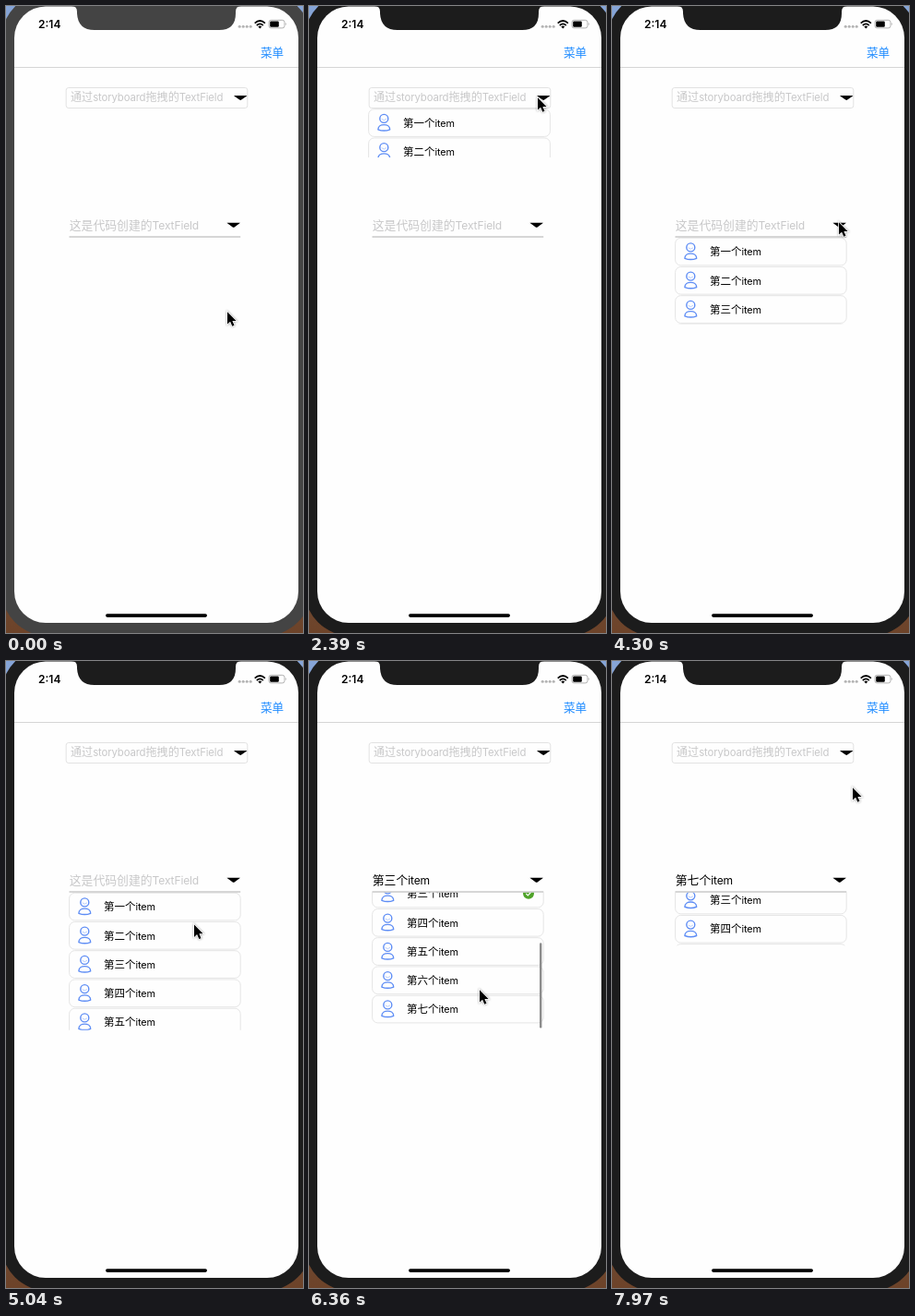
Recreate the animation shown at these times as an HTML page. Size 322 by 679 pixels, loop 8000 ms.

```html
<!DOCTYPE html>
<html lang="zh">
<head>
<meta charset="utf-8">
<title>TextField</title>
<style>
html, body { margin: 0; width: 100%; height: 100%; overflow: hidden; }
#stage { display: block; width: 322px; height: 679px; }
text { font-family: Inter, "Noto Sans CJK SC", "Noto Sans CJK", sans-serif; }
.en { font-size: .94em; letter-spacing: -.012em; }
.hint { fill: #c8c8c9; }
.row rect { fill: #fefefe; stroke: #e3e3e3; stroke-width: .9; }
#bezel, #notch { fill: #444; }
.focus #bezel, .focus #notch { fill: #1c1c1c; }
</style>
</head>
<body>
<svg id="stage" viewBox="0 0 322 679">
  <defs>
    <linearGradient id="desk" x1="0" y1="0" x2="0" y2="1">
      <stop offset="0" stop-color="#86a5d8"/>
      <stop offset=".5" stop-color="#77706f"/>
      <stop offset="1" stop-color="#6d4329"/>
    </linearGradient>
    <g id="user" fill="none" stroke="#5e8df5" stroke-width="1.4">
      <circle cx="7" cy="5" r="4.5"/>
      <path d="M4.4 5.4Q7 8.2 9.6 5.4" stroke-width=".8" stroke="#a9c2fa"/>
      <path d="M.6 16.9C.6 10 13.4 10 13.4 16.9Q7 19.4 .6 16.9Z" stroke-linejoin="round"/>
    </g>
    <g id="tick">
      <circle r="6" fill="#4fa329"/>
      <path d="M-2.7 .1L-.7 2.1L2.9-1.7" fill="none" stroke="#fff" stroke-width="1.3"/>
    </g>
    <path id="arrow" d="M0 0H14.4Q13.6 1 11.5 2.2L8.2 4.6Q7.2 5.2 6.2 4.6L2.9 2.2Q.8 1 0 0Z"/>
  </defs>

  <rect width="322" height="679" fill="url(#desk)"/>
  <rect id="bezel" x="-5" y="-14" width="336" height="696" rx="50"/>
  <rect x="9" y=".5" width="308" height="667.5" rx="34" fill="#fefefe"/>
  <path id="notch" d="M71 0Q77 0 77 6V8Q78 26 96 26H231Q249 26 249 8V6Q249 0 255 0Z"/>

  <text x="35" y="24" font-size="12" font-weight="600">2:14</text>
  <g fill="#b4b4b4">
    <circle cx="253.2" cy="22.3" r="1.5"/><circle cx="257.2" cy="22.3" r="1.5"/>
    <circle cx="261.2" cy="22.3" r="1.5"/><circle cx="265.2" cy="22.3" r="1.5"/>
  </g>
  <g fill="none" stroke="#000" stroke-width="1.7">
    <path d="M269.7 18.6Q275.3 13.4 280.9 18.6"/>
    <path d="M271.8 21Q275.3 17.8 278.8 21"/>
  </g>
  <path d="M273.3 22.3Q275.3 20.7 277.3 22.3L275.3 24.4Z"/>
  <rect x="285" y="15.3" width="17" height="8.6" rx="2.4" fill="none" stroke="#a8a8a8" stroke-width=".9"/>
  <rect x="286.2" y="16.5" width="9.6" height="6.2" rx="1.2"/>
  <path d="M303.2 18.1Q304.8 19.6 303.2 21.1Z" fill="#a8a8a8"/>

  <text x="276" y="54.7" font-size="12.6" fill="#1e8bff">菜单</text>
  <rect x="9" y="66" width="308" height="1" fill="#d6d6d6"/>

  <rect x="65.2" y="88.5" width="196.6" height="22" rx="2.6" fill="#fefefe" stroke="#dfdfdf" stroke-width=".9"/>
  <text class="hint" x="70" y="103" font-size="12.1">通过<tspan class="en">storyboard</tspan>拖拽的<tspan class="en">TextField</tspan></text>
  <use href="#arrow" x="247" y="97"/>
  <svg id="listA" x="62" y="111" width="204" height="0"></svg>

  <text id="value" x="68.7" y="241.8" font-size="12.85"></text>
  <use href="#arrow" x="239.5" y="234.8"/>
  <svg id="listB" x="66" y="250.5" width="192" height="0"></svg>
  <rect x="68.5" y="249.3" width="185.7" height="1.4" fill="#c6c6c6"/>
  <rect id="thumb" x="250" width="2.4" rx="1.2" fill="#8c8c8c"/>

  <rect x="108" y="658.3" width="110" height="3.6" rx="1.8"/>
  <path id="cursor" d="M1 1.2V14.6L4.1 11.7L6.3 16.7L8.5 15.8L6.4 10.9H10.6Z" stroke="#fff" stroke-width="1.6" paint-order="stroke" style="filter:drop-shadow(0 .8px .8px #0006)"/>
</svg>

<script>
const $ = id => document.getElementById(id);
const LOOP = 8000, FIRST = 1350, STEP = 147.1;
const ROW = 31.25, VIEW = 149.2, MAX = ROW * 7 - VIEW;
const nums = [...'一二三四五六七'];
const item = n => `第${n}个<tspan class="en">item</tspan>`;

function fillList(list, count, width) {
  list.innerHTML = '<g>' + nums.slice(0, count).map((n, i) => `
    <g class="row" transform="translate(0 ${i * ROW})">
      <rect x="2.6" y=".7" width="${width}" height="29.7" rx="6"/>
      <use href="#user" x="12.3" y="5.9"/>
      <text x="40" y="19.8" font-size="11.5">${item(n)}</text>
      <use class="mark" href="#tick" x="172" y="15.3" visibility="hidden"/>
    </g>`).join('') + '</g>';
}
fillList($('listA'), 3, 196.8);
fillList($('listB'), 7, 185.6);
const body = $('listB').firstElementChild;
const marks = $('listB').querySelectorAll('.mark');

// keys are [tick, ...values]
const path = [
  [0, 239, 330], [1, 239, 322], [3, 246, 190], [5, 247, 98], [12, 247, 98],
  [14, 248, 105], [15, 251, 124], [17, 250, 200], [18, 246, 229], [19, 245, 233],
  [24, 245, 233], [27, 182, 310], [28, 166, 322], [29, 166, 323], [30, 166, 338],
  [31, 169, 363], [32, 173, 384], [33, 178, 396], [34, 183, 374], [35, 184, 355],
  [37, 184, 358], [39, 180, 373], [40, 179, 375], [41, 186, 362], [42, 218, 292],
  [43, 243, 238], [44, 246, 234], [45, 251, 205], [46, 260, 136]
];
const scroll = [[33, 0], [34, 32], [35, 76.5], [36, 72], [37, 70], [38, MAX]];
const glow = [[33, 0], [34, 1], [37, 1], [39, 0]];

function at(keys, n) {
  if (n <= keys[0][0]) return keys[0].slice(1);
  const i = keys.findIndex(k => k[0] > n);
  if (i < 0) return keys[keys.length - 1].slice(1);
  const a = keys[i - 1], b = keys[i], p = (n - a[0]) / (b[0] - a[0]);
  return a.slice(1).map((v, j) => v + (b[j + 1] - v) * p);
}

function ease(t, start, length) {
  const p = Math.min(1, Math.max(0, (t - start) / length));
  return p * p * (3 - 2 * p);
}
const opened = (t, open, close) => ease(t, open, 500) - ease(t, close, 440);

function draw(ms) {
  const n = ms < FIRST ? 0 : Math.floor((ms - FIRST) / STEP) + 1;
  const t = n ? FIRST + (n - 1) * STEP : 0;
  const pick = n >= 40 ? 6 : n >= 29 ? 2 : -1;
  const [x, y] = at(path, n), [s] = at(scroll, n);

  $('stage').classList.toggle('focus', n >= 6);
  $('cursor').setAttribute('transform', `translate(${x} ${y})`);
  $('listA').setAttribute('height', opened(t, 2107, 2975) * 93.5);
  $('listB').setAttribute('height', opened(t, 3997, 7716) * VIEW);
  body.setAttribute('transform', `translate(0 ${-s})`);

  const value = $('value');
  if (value.dataset.pick !== String(pick)) {
    value.dataset.pick = pick;
    value.classList.toggle('hint', pick < 0);
    value.innerHTML = pick < 0 ? '这是代码创建的<tspan class="en">TextField</tspan>' : item(nums[pick]);
    marks.forEach((m, i) => m.setAttribute('visibility', i === pick ? 'visible' : 'hidden'));
  }

  const track = VIEW - 4, over = Math.max(0, s - MAX);
  const size = track * VIEW / (ROW * 7) - over;
  const thumb = $('thumb');
  thumb.setAttribute('y', 252.2 + (track - size) * Math.min(1, s / MAX));
  thumb.setAttribute('height', size);
  thumb.setAttribute('opacity', at(glow, n)[0]);
}

const begin = performance.now();
function frame() {
  draw((performance.now() - begin) % LOOP);
  requestAnimationFrame(frame);
}
frame();
</script>
</body>
</html>
```
